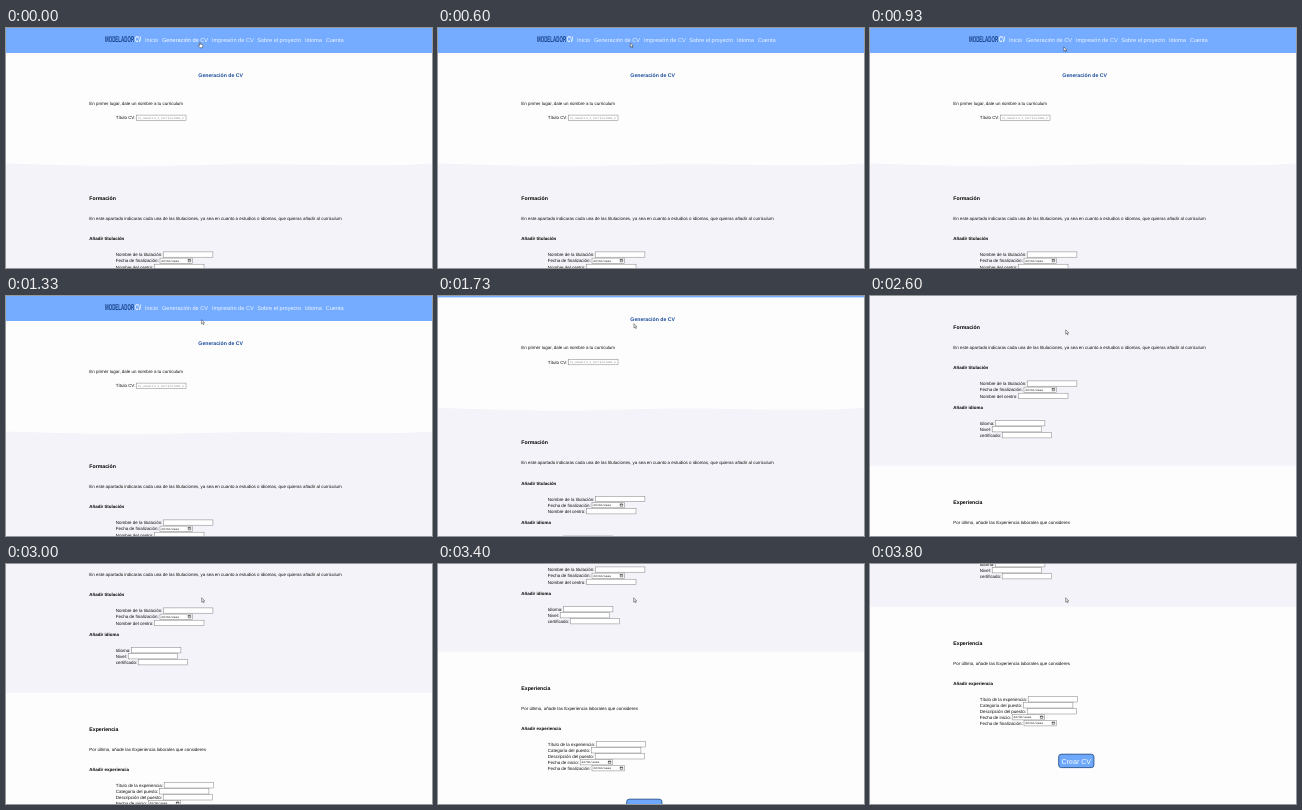
Recreate the animation shown at these times as an HTML page. Size 426x240 px, loop 3.87 s.

```html
<!DOCTYPE html>
<html lang="es">
<head>
<meta charset="utf-8">
<title>Generación de CV</title>
<style>
  html, body { margin: 0; width: 100%; height: 100%; overflow: hidden; background: #fdfdfe; }
  svg { display: block; width: 100%; height: 100%; }
  text { font: 4.44px "Liberation Sans", Arial, sans-serif; fill: #111; text-rendering: geometricPrecision; }
  .h3 { font-size: 5.19px; font-weight: bold; fill: #000; }
  .h4 { font-weight: bold; fill: #000; }
  .title { fill: #174a98; text-anchor: middle; }
  .nav { font-size: 5.6px; fill: #eef5ff; }
  .logo { font-size: 8.4px; font-weight: bold; fill: #173f86; }
  .mono { font: 2.96px "Liberation Mono", monospace; fill: #222; }
  .hint { fill: #858585; }
  .button { font-size: 7.1px; fill: #fff; text-anchor: middle; }
  .field { fill: #fff; stroke: #808080; stroke-width: .5; }
</style>
</head>
<body>
<svg viewBox="0 0 426 240" preserveAspectRatio="none">
  <g id="page">
    <rect width="426" height="510" fill="#fdfdfe"/>
    <path d="M0 135.5C60 137 110 139 150 138S230 135.5 290 136.5S390 138 426 135.5V308.7H0Z" fill="#f3f3f9"/>
    <rect width="426" height="25" fill="#75acff"/>
  </g>
  <g id="cursor" stroke="#222" stroke-width=".45" stroke-linejoin="round" fill="#fff">
    <path id="arrow" d="M0 0V4.3L1 3.4L1.7 5L2.4 4.7L1.7 3.1H3Z"/>
    <path id="hand" d="M.5 .4Q1 -.2 1.4 .4V2L3.6 2.5Q4 2.7 3.9 3.3L3.4 5.6H1L-.7 3.5Q-.6 2.8 0 3L.5 3.4Z"/>
  </g>
</svg>
<script>
const $ = id => document.getElementById(id);
const page = $("page"), cursor = $("cursor"), arrow = $("arrow"), hand = $("hand");

function add(tag, attrs, content) {
  const el = document.createElementNS("http://www.w3.org/2000/svg", tag);
  for (const key in attrs) el.setAttribute(key, attrs[key]);
  if (content) el.textContent = content;
  return page.appendChild(el);
}
const text = (x, y, content, cls = "") => add("text", { x, y, class: cls }, content);
const field = (x, y, width) => add("rect", { x, y: y - 4.3, width, height: 5.3, class: "field" });

function row(y, label, x) {
  text(109.8, y, label);
  field(x, y, 49.5);
}
function dateRow(y, label, x) {
  text(109.8, y, label);
  field(x, y, 32.5);
  text(x + 1.3, y - .6, "dd/mm/aaaa", "mono");
  add("path", { d: `M${x + 28.2} ${y - 2.9}h2.5v2.3h-2.5zv.5h2.5`, fill: "none", stroke: "#222", "stroke-width": .5 });
}

// Header
const logo = (x, content, fill) =>
  add("text", { class: "logo", transform: `translate(${x} 13.8) scale(.53 1)`, style: `fill:${fill}` }, content);
logo(99, "MODELADOR", "#173f86");
logo(129, "CV", "#fff");
text(139, 14, "Inicio", "nav");
const link = text(156, 14, "Generación de CV", "nav");
text(206, 14, "Impresión de CV", "nav");
text(251.2, 14, "Sobre el proyecto", "nav");
text(299, 14, "Idioma", "nav");
text(319.7, 14, "Cuenta", "nav");

// Name of the document
text(214.7, 49, "Generación de CV", "h3 title");
text(83.3, 76.5, "En primer lugar, dale un nombre a tu curriculum");
row(91.4, "Título CV:", 130.5);
text(131.7, 90.7, "cv_usuario_1_curriculum1_e", "mono hint");

// Education
text(83.3, 172, "Formación", "h3");
text(83.3, 192, "En este apartado indicaras cada una de las titulaciones, ya sea en cuanto a estudios o idiomas, que quieras añadir al curriculum");
text(83.3, 212.3, "Añadir titulación", "h4");
row(228.2, "Nombre de la titulación:", 157.4);
dateRow(234.4, "Fecha de finalización:", 154);
row(240.5, "Nombre del centro:", 148.5);
text(83.3, 251.6, "Añadir idioma", "h4");
row(267.9, "Idioma:", 125.4);
row(273.9, "Nivel:", 122.2);
row(279.9, "certificado:", 132.2);

// Experience
text(83.3, 347, "Experiencia", "h3");
text(83.3, 366.7, "Por último, añade las Experiencia laborales que consideres");
text(83.3, 386.9, "Añadir experiencia", "h4");
row(403, "Título de la experiencia:", 158.2);
row(409, "Categoría del puesto:", 153.4);
row(415, "Descripción del puesto:", 157.2);
dateRow(420.9, "Fecha de inicio:", 142.2);
dateRow(426.9, "Fecha de finalización:", 154);
add("rect", { x: 188.7, y: 456.2, width: 35.2, height: 13.4, rx: 2.6, fill: "#6ea8fb", stroke: "#24528f", "stroke-width": .9 });
text(206.3, 465.5, "Crear CV", "button");

// Keys are [time, value]
const scrollKeys = [[1530, 0], [2133, 70], [2600, 139], [3400, 221], [3800, 266]];
const xKeys = [[0, 193], [600, 192.3], [1333, 195.6], [2133, 196.2], [2600, 195.7]];
const yKeys = [[0, 14.2], [600, 14.8], [1333, 23.6], [2133, 31.6], [2600, 33.8]];

function at(keys, t) {
  if (t <= keys[0][0]) return keys[0][1];
  for (let i = 1; i < keys.length; i++) {
    const [t0, a] = keys[i - 1], [t1, b] = keys[i];
    if (t <= t1) return a + (b - a) * (t - t0) / (t1 - t0);
  }
  return keys[keys.length - 1][1];
}

const LOOP = 3870, STEP = 1000 / 15;

function draw(ms) {
  const t = Math.min(57, Math.floor((ms % LOOP + 5) / STEP)) * STEP;
  const over = t < 400;
  page.setAttribute("transform", `translate(0 ${-at(scrollKeys, t)})`);
  cursor.setAttribute("transform", `translate(${at(xKeys, t)} ${at(yKeys, t)})`);
  hand.style.display = over ? "" : "none";
  arrow.style.display = over ? "none" : "";
  link.style.fill = over ? "#fff" : "";
}

const start = performance.now();
function tick() {
  draw(performance.now() - start);
  requestAnimationFrame(tick);
}
tick();
</script>
</body>
</html>
```
